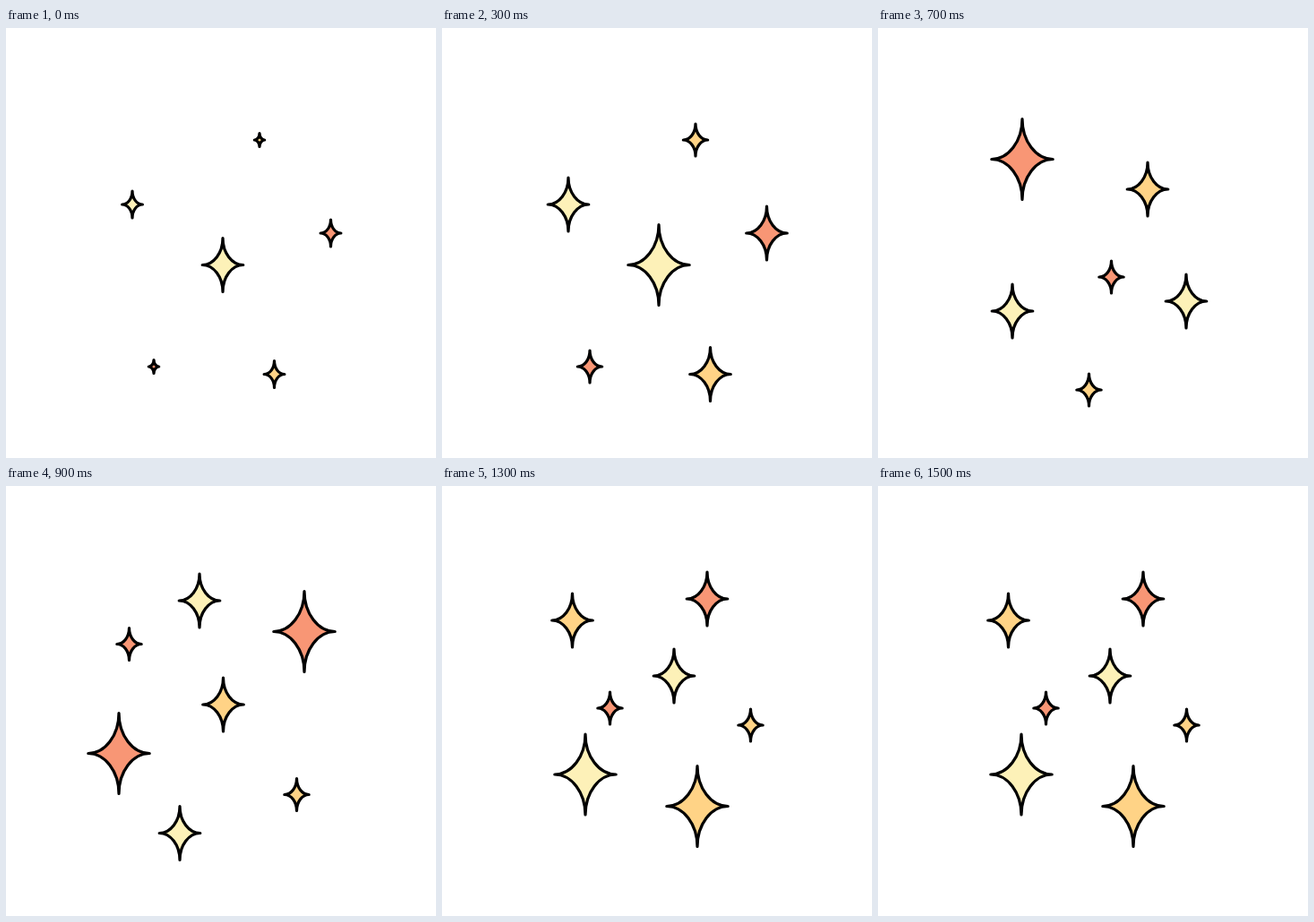
Animation of 480 by 480 pixels, one loop 1.6 s. Source, as an HTML page:

```html
<!DOCTYPE html>
<html lang="en">
<head>
<meta charset="utf-8">
<title>Twinkling stars</title>
<style>
html, body { margin: 0; width: 100%; height: 100%; overflow: hidden; background: #fff; }
svg { display: block; width: 100vw; height: 100vh; }
path { stroke: #000; stroke-width: 3.2; stroke-linejoin: round; }
</style>
</head>
<body>
<svg id="sky" viewBox="0 0 480 480"></svg>
<script>
const YELLOW = '#fdf1b8', ORANGE = '#ffd386', CORAL = '#f89675';
const STEP = 100;
const PULSE = [0, 1, 2, 1];

// Star scale at the small, medium and large step of the pulse
const BIG = [2, 3, 4], MID = [1, 2, 3], TINY = [0.5, 1.2, 2];

// Each scene: [x, y, sizes, colour]
const scenes = [
  [
    [283, 125, TINY, ORANGE], [141, 197, MID, YELLOW], [362.5, 229, MID, CORAL],
    [242, 264.5, BIG, YELLOW], [165, 378, TINY, CORAL], [299.5, 386.5, MID, ORANGE]
  ],
  [
    [161, 146.5, BIG, CORAL], [301, 180, MID, ORANGE], [260.5, 278, TINY, CORAL],
    [150, 316, MID, YELLOW], [344, 305, MID, YELLOW], [235.5, 404, TINY, ORANGE]
  ],
  [
    [216, 128, MID, YELLOW], [333, 162.5, BIG, CORAL], [137.5, 176.5, TINY, CORAL],
    [242.5, 244, MID, ORANGE], [126, 298.5, BIG, CORAL], [324.5, 344.5, TINY, ORANGE],
    [194, 387.5, MID, YELLOW]
  ],
  [
    [145.5, 150, MID, ORANGE], [296, 126, MID, CORAL], [259, 212, MID, YELLOW],
    [187.5, 248, TINY, CORAL], [344.5, 267, TINY, ORANGE], [160, 322, BIG, YELLOW],
    [285, 357.5, BIG, ORANGE]
  ]
];

// Four inward quarter ellipses joined at the tips
function starPath(x, y, scale) {
  const w = 11.4 * scale, h = 15 * scale;
  const arc = (dx, dy) => `a${w} ${h} 0 0 0 ${dx} ${dy}`;
  return `M${x} ${y - h}${arc(w, h)}${arc(-w, h)}${arc(-w, -h)}${arc(w, -h)}Z`;
}

const sky = document.getElementById('sky');
const start = performance.now();
let shown = -1;

function draw() {
  const elapsed = Math.max(0, performance.now() - start);
  const step = Math.floor(elapsed / STEP) % (scenes.length * PULSE.length);
  if (step !== shown) {
    shown = step;
    const size = PULSE[step % PULSE.length];
    sky.innerHTML = scenes[Math.floor(step / PULSE.length)]
      .map(([x, y, sizes, fill]) => `<path fill="${fill}" d="${starPath(x, y, sizes[size])}"/>`)
      .join('');
  }
  requestAnimationFrame(draw);
}
draw();
</script>
</body>
</html>
```
